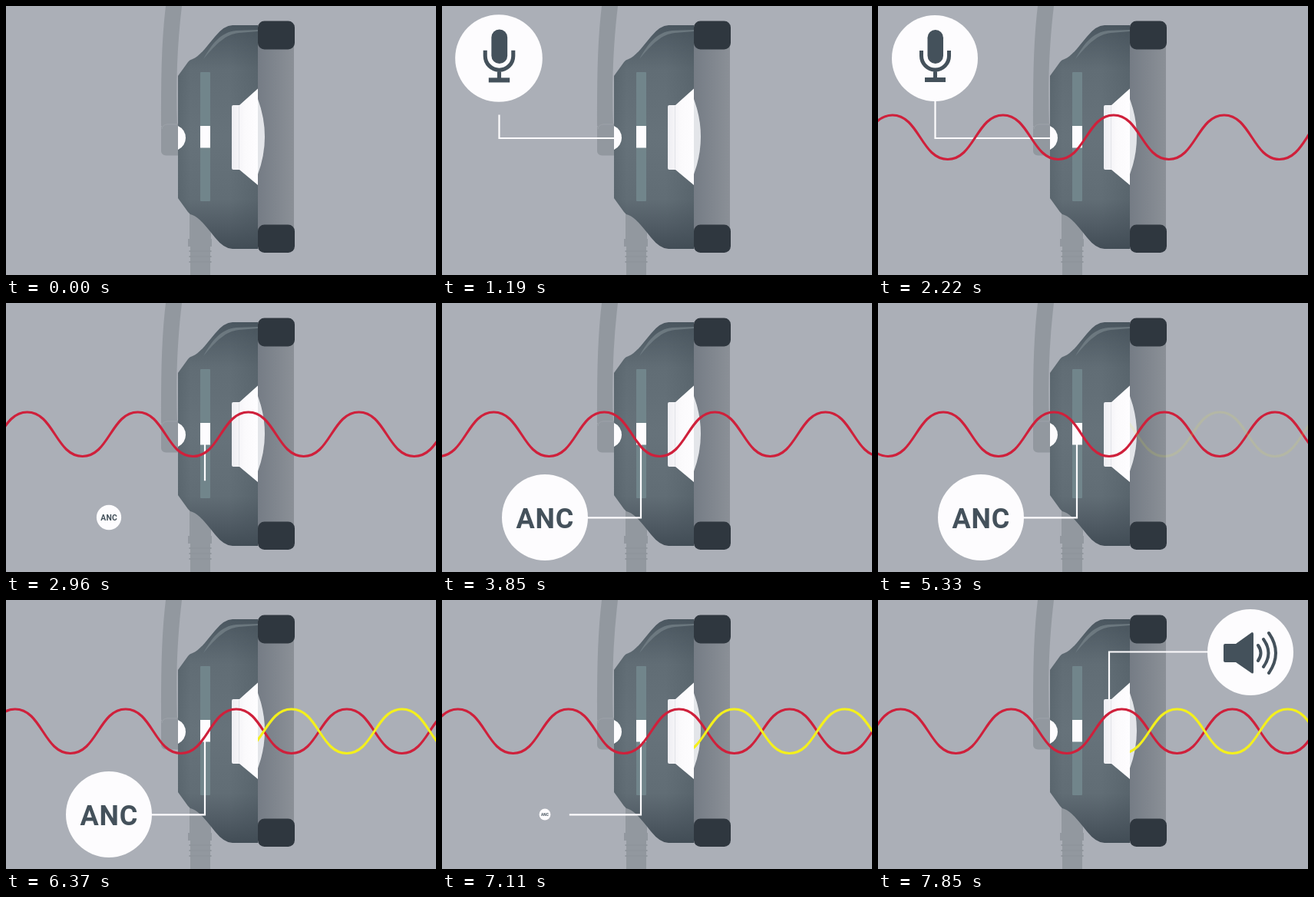
Animation of 560 by 350 pixels, one loop 8 s. Source, as an HTML page:

```html
<!DOCTYPE html>
<html lang="en">
<head>
<meta charset="utf-8">
<title>Active noise cancelling</title>
<style>
  html, body { margin: 0; width: 100%; height: 100%; overflow: hidden; background: #abafb7; }
  svg { display: block; width: 100%; height: 100%; }
  .lead { fill: none; stroke: #fdfcfe; stroke-width: 2.2; }
  .ink { fill: #44515b; }
  .stroke { fill: none; stroke: #44515b; }
  .wave { fill: none; stroke-width: 3.2; stroke-linecap: round; }
  circle { fill: #fdfcfe; }
  text { font: 700 36px Roboto, Arial, sans-serif; letter-spacing: .7px; text-anchor: middle; }
</style>
</head>
<body>
<svg viewBox="0 0 560 350">
  <defs>
    <linearGradient id="shell" x2="0" y2="1">
      <stop offset="0" stop-color="#4b5760"/>
      <stop offset=".2" stop-color="#616d75"/>
      <stop offset=".5" stop-color="#66727a"/>
      <stop offset=".78" stop-color="#616d75"/>
      <stop offset="1" stop-color="#424d56"/>
    </linearGradient>
    <linearGradient id="shade">
      <stop offset="0" stop-color="#3f4b53" stop-opacity=".22"/>
      <stop offset=".16" stop-color="#3f4b53" stop-opacity="0"/>
      <stop offset=".65" stop-color="#3f4b53" stop-opacity="0"/>
      <stop offset="1" stop-color="#3f4b53" stop-opacity=".25"/>
    </linearGradient>
    <linearGradient id="cushion">
      <stop offset="0" stop-color="#757c85"/>
      <stop offset="1" stop-color="#8b9097"/>
    </linearGradient>
    <linearGradient id="cone">
      <stop offset="0" stop-color="#eeeef2"/>
      <stop offset=".5" stop-color="#fbfafc"/>
      <stop offset="1" stop-color="#fefdff"/>
    </linearGradient>
    <path id="body" d="M224 91L237 73Q239 70 243 69C252 66 262 52 272 40Q284 25 295 25H328V316H295Q284 316 272 301C262 289 252 275 243 272Q239 271 237 268L224 250Z"/>
  </defs>

  <rect width="560" height="350" fill="#abafb7"/>

  <!-- headband and cable -->
  <path d="M208 0H229C223 50 221 100 223 156H202C202 100 202 50 208 0Z" fill="#92989f"/>
  <rect x="202" y="153" width="30" height="41.500" rx="6" fill="#92989f"/>
  <path d="M203 160Q204 154 210 154H224" fill="none" stroke="#9da2a9"/>
  <path d="M239 268H267V303H268V313H266V350H240V313H237V303H239Z" fill="#92989f"/>
  <path d="M238.500 319H267.500M238.500 326H267.500M238.500 333H267.500" stroke="#8f959c" stroke-width="2"/>

  <!-- ear cup -->
  <rect x="328" y="45" width="47" height="250" fill="url(#cushion)"/>
  <use href="#body" fill="url(#shell)"/>
  <use href="#body" fill="url(#shade)"/>
  <path d="M257 69C269 48 280 34 300 32L328 31V33L303 35C286 37 275 48 257 69Z" fill="#7c878e" opacity=".65"/>
  <rect x="328" y="19.500" width="48" height="37" rx="8.500" fill="#2f373f"/>
  <rect x="328" y="284.500" width="48" height="36.500" rx="8.500" fill="#2f373f"/>
  <rect x="253" y="86" width="13" height="168" rx="1" fill="#71858b"/>
  <rect x="253" y="156" width="13" height="28.500" fill="#fdfcfe"/>
  <path d="M224 156A17 17 0 0 1 224 187Z" fill="#fdfcfe"/>
  <path d="M328 121Q346 170 328 219Z" fill="#e3e5e9"/>
  <path d="M296 129H304L328 107.500V233L304 213H296Q294 213 294 211V131Q294 129 296 129Z" fill="url(#cone)"/>
  <path d="M303.500 130V212" stroke="#e2e3e8"/>

  <g id="mic">
    <path class="lead" pathLength="1" d="M224 172H74.500V68"/>
    <g class="badge">
      <circle cx="74" cy="68" r="56"/>
      <rect class="ink" x="64.500" y="31" width="20.500" height="44" rx="10.250"/>
      <path class="stroke" stroke-width="5" d="M56.500 58V65A18 18 0 0 0 92.500 65V58M74.500 83V95"/>
      <rect class="ink" x="61" y="93" width="27" height="6"/>
    </g>
  </g>

  <g id="anc">
    <path class="lead" pathLength="1" d="M259 184V279.300H134"/>
    <g class="badge">
      <circle cx="134" cy="279" r="56"/>
      <text class="ink" x="134.300" y="292.800">ANC</text>
    </g>
  </g>

  <g id="speaker">
    <path class="lead" pathLength="1" d="M301 129V67.500H485"/>
    <g class="badge">
      <circle cx="485" cy="68" r="56"/>
      <path class="ink" d="M452 57H466L487 42Q489 42 489 44V94Q489 96 487 95.500L466 81H452Q450 81 450 79V59Q450 57 452 57Z"/>
      <path class="stroke" stroke-width="4" stroke-linecap="round" d="M495 59Q502 69 495 79M502 51Q515 69 502 87M509 43Q527 69 509 95"/>
    </g>
  </g>

  <clipPath id="ear"><rect x="328" width="232" height="350"/></clipPath>
  <path id="noise" class="wave" stroke="#cf203b"/>
  <g clip-path="url(#ear)"><path id="antinoise" class="wave" stroke="#f4f01c"/></g>
</svg>
<script>
  const LOOP = 8000, HALF_WAVE = 72, SPEED = 0.2065;
  const CREST_Y = 142, TROUGH_Y = 199.5;
  const HANDLE = HALF_WAVE * 0.48;

  const callouts = [
    { id: 'mic', cx: 74, cy: 68, enter: 850, leave: 2383 },
    { id: 'anc', cx: 134, cy: 279, enter: 2858, leave: 6850 },
    { id: 'speaker', cx: 485, cy: 68, enter: 7318, leave: Infinity },
  ].map(c => {
    const group = document.getElementById(c.id);
    return { ...c, lead: group.querySelector('.lead'), badge: group.querySelector('.badge') };
  });
  const noise = document.getElementById('noise');
  const antinoise = document.getElementById('antinoise');

  const ramp = (t, start, duration) => Math.min(1, Math.max(0, (t - start) / duration));

  function backOut(p, overshoot = 1.15) {
    const q = p - 1;
    return 1 + (overshoot + 1) * q ** 3 + overshoot * q ** 2;
  }

  function drawCallout({ cx, cy, enter, leave, lead, badge }, t) {
    const leaving = t >= leave;
    const length = leaving ? 1 - ramp(t, leave + 235, 180) : ramp(t, enter, 480);
    const pop = leaving ? 1 - ramp(t, leave, 270) : ramp(t, enter + 80, 300);
    const scale = backOut(pop);
    lead.setAttribute('visibility', length > 0 ? 'visible' : 'hidden');
    lead.setAttribute('stroke-dasharray', `${length} 2`);
    badge.setAttribute('visibility', pop > 0 ? 'visible' : 'hidden');
    badge.setAttribute('transform', `translate(${cx} ${cy}) scale(${scale}) translate(${-cx} ${-cy})`);
  }

  // Smooth wave of Bezier half-periods, with rounder crests than a sine.
  function drawWave(path, crest, opacity) {
    let x = crest % (2 * HALF_WAVE) - 2 * HALF_WAVE;
    let d = `M${x} ${CREST_Y}`;
    for (let y = TROUGH_Y; x < 570; y = CREST_Y + TROUGH_Y - y) {
      x += HALF_WAVE;
      d += `c${HANDLE} 0 ${HALF_WAVE - HANDLE} ${y > CREST_Y ? TROUGH_Y - CREST_Y : CREST_Y - TROUGH_Y} `
         + `${HALF_WAVE} ${y > CREST_Y ? TROUGH_Y - CREST_Y : CREST_Y - TROUGH_Y}`;
    }
    path.setAttribute('d', d);
    path.setAttribute('opacity', opacity);
  }

  function render(t) {
    const crest = 136.2 + SPEED * t;
    callouts.forEach(c => drawCallout(c, t));
    drawWave(noise, crest, ramp(t, 1520, 600));
    drawWave(antinoise, crest + HALF_WAVE, ramp(t, 5260, 600));
  }

  const startTime = performance.now();
  function tick() {
    render((performance.now() - startTime) % LOOP);
    requestAnimationFrame(tick);
  }
  tick();
</script>
</body>
</html>
```
